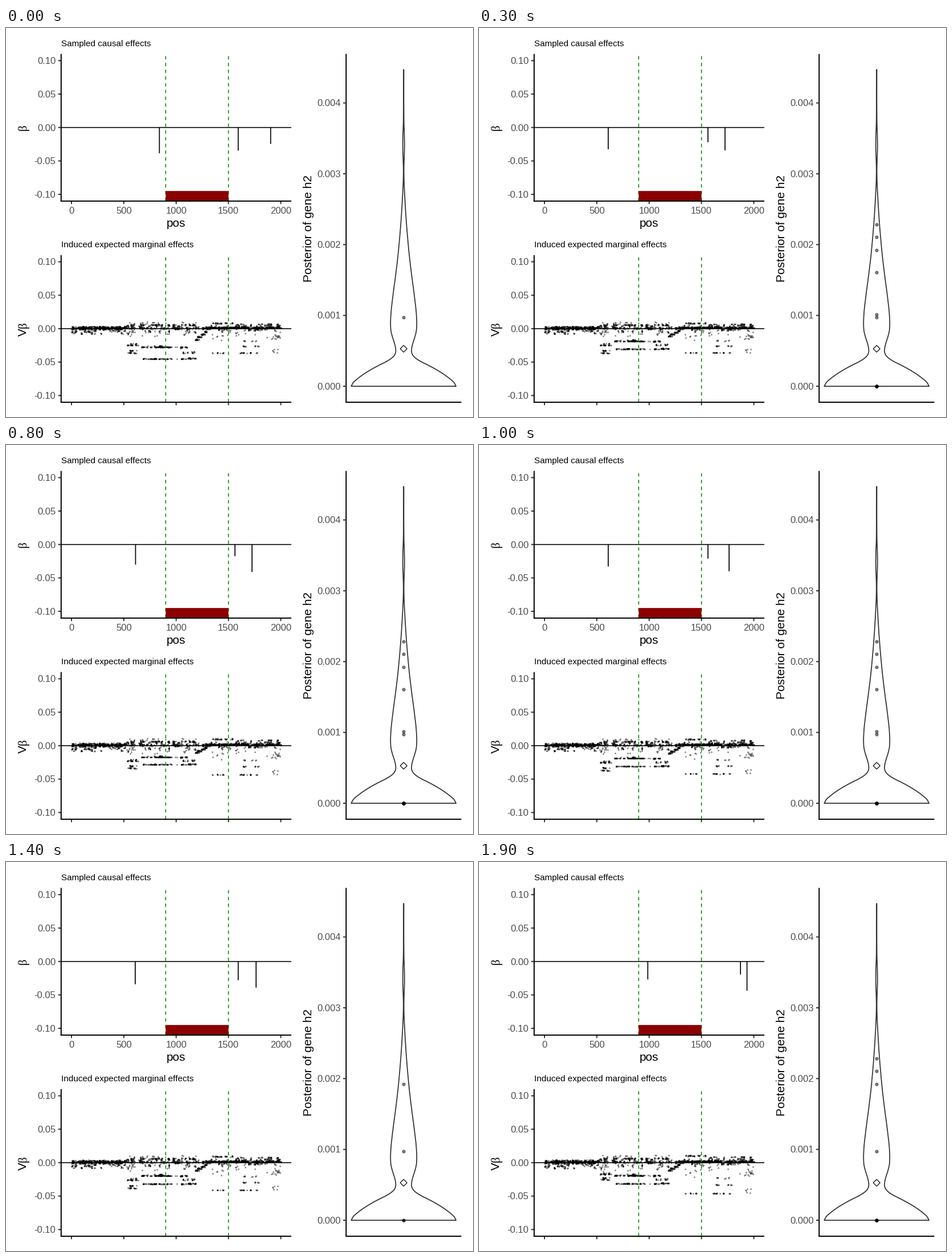
Animation, 820 px wide and 683 px high, one loop 2000 ms. Source, as a matplotlib script:

```python
import numpy as np
import matplotlib.pyplot as plt
from matplotlib.animation import FuncAnimation
from matplotlib.collections import LineCollection
from matplotlib.patches import Polygon, Rectangle

W, H, DPI = 820, 683, 100
PX = 72 / DPI
SANS, SERIF = "Liberation Sans", "Liberation Serif"
GREY, DARK, GREEN = "#4d4d4d", "#333333", "#008b00"
plt.rcParams["path.snap"] = False

# the small margin keeps the pixel size from being rounded down
fig = plt.figure(figsize=((W + .01) / DPI, (H + .01) / DPI), dpi=DPI, facecolor="white")
ax = fig.add_axes([0, 0, 1, 1])
ax.set_xlim(0, W)
ax.set_ylim(H, 0)
ax.axis("off")

TOP, LOW, MID = 174.7, 527.9, 698.2


def pos_x(p):
    return 115 + 0.18375 * np.asarray(p)


def beta_y(b, zero):
    return zero - 1174 * np.asarray(b)


def h2_y(v):
    return 629 - 124350 * np.asarray(v)


def line(x0, y0, x1, y1, color="black", width=1.6, z=3, **kw):
    ax.plot([x0, x1], [y0, y1], color=color, lw=width * PX, zorder=z,
            solid_capstyle="butt", dash_capstyle="butt", **kw)


def text(x, y, s, size=12, color="black", ha="center", rot=0, font=SANS):
    ax.text(x, y, s, fontsize=size, color=color, ha=ha, va="baseline",
            rotation=rot, rotation_mode="anchor", family=font)


def y_tick(x, y, label):
    line(x - 5.2, y, x, y, DARK, 2)
    text(x - 9.4, y + 5.8, label, color=GREY, ha="right")


def effect_panel(zero, title, labels):
    top, bottom = zero - 129.2, zero + 129.2
    line(96.8, top, 96.8, bottom + 1, width=2, z=6)
    line(95.8, bottom, 501, bottom, width=2, z=6)
    line(96.8, zero, 501, zero)
    for b in (0.1, 0.05, 0, -0.05, -0.1):
        y_tick(96.8, beta_y(b, zero), f"{b:.2f}")
    for p in range(0, 2001, 500):
        x = pos_x(p)
        line(x, bottom, x, bottom + 5.2, DARK, 2)
        if labels:
            text(x, 326, str(p), color=GREY)
    for p in (900, 1500):
        x = pos_x(p)
        line(x, bottom, x, top, GREEN, z=4, dashes=(3.7, 3.7))
    text(96.8, top - 13.5, title, size=11, ha="left")


def smooth(xs, ys, n=12):
    """Cubic curve through the given points."""
    slope = np.gradient(ys, xs)
    t = np.linspace(0, 1, n, endpoint=False)
    out = []
    for i in range(len(xs) - 1):
        d = xs[i + 1] - xs[i]
        y = ((2 * t**3 - 3 * t**2 + 1) * ys[i] + (t**3 - 2 * t**2 + t) * d * slope[i]
             + (3 * t**2 - 2 * t**3) * ys[i + 1] + (t**3 - t**2) * d * slope[i + 1])
        out.append(np.column_stack([xs[i] + d * t, y]))
    return np.vstack(out + [[[xs[-1], ys[-1]]]])


# static parts
effect_panel(TOP, "Sampled causal effects", True)
effect_panel(LOW, "Induced expected marginal effects", False)
gene = pos_x([900, 1500])
ax.add_patch(Rectangle((gene[0], 286.2), gene[1] - gene[0], 17.7, fc="#8b0000", lw=0, zorder=5))
text(298.7, 349, "pos", size=15)
text(36, 174.7, "β", size=15, rot=90, font=SERIF)
text(36, 540.5, "V", size=15, rot=90, ha="left")
text(36, 526.5, "β", size=15, rot=90, ha="left", font=SERIF)

line(597.2, 45.5, 597.2, 658, width=2)
line(596.2, 657.1, 799.5, 657.1, width=2)
for v in range(5):
    y_tick(597.2, h2_y(v / 1000), f"{v / 1000:.3f}")
text(537, 351.5, "Posterior of gene h2", size=15, rot=90)

shape = [(73, .3), (140, .3), (165, .5), (190, 1.3), (210, 1.5), (230, .9),
         (248, .4), (265, .6), (300, 2.2), (340, 4.7), (375, 7.6), (400, 10),
         (435, 14.2), (470, 18.8), (505, 22.5), (520, 23), (532, 22.2),
         (543, 19.5), (553, 16.3), (562, 14.2), (570, 14.2), (575, 16.5),
         (580, 21.5), (586, 31), (592, 43), (599, 56), (607, 69), (615, 80),
         (622, 88), (629, 92)]
curve = smooth(*np.array(shape, float).T)
sides = np.vstack([np.column_stack([MID - curve[:, 1], curve[:, 0]]),
                   np.column_stack([MID + curve[:, 1], curve[:, 0]])[::-1]])
ax.add_patch(Polygon(sides, fc="white", ec=DARK, lw=1.75 * PX, joinstyle="round", zorder=2))
ax.add_patch(Polygon([(MID - 6, 563.2), (MID, 557.2), (MID + 6, 563.2), (MID, 569.2)],
                     fc="white", ec="black", lw=1.2 * PX, zorder=5))

# posterior samples: position and effect of three causal sites
SITES = [
    (840, -.0385, 1593, -.0345, 1903, -.0245),
    (853, -.0330, 1562, -.0300, 1873, -.0270),
    (612, -.0310, 1430, -.0440, 1873, -.0250),
    (609, -.0340, 1593, -.0280, 1764, -.0390),
    (840, -.0300, 1338, -.0450, 1903, -.0230),
    (612, -.0325, 1562, -.0295, 1764, -.0445),
    (609, -.0335, 1562, -.0240, 1725, -.0380),
    (853, -.0290, 1593, -.0310, 1873, -.0290),
    (987, -.0268, 1873, -.0195, 1935, -.0437),
    (987, -.0290, 1593, -.0250, 1903, -.0380),
    (612, -.0310, 1338, -.0400, 1873, -.0250),
    (609, -.0325, 1562, -.0220, 1725, -.0342),
    (609, -.0350, 1562, -.0260, 1764, -.0360),
    (609, -.0385, 1430, -.0445, 1873, -.0262),
    (612, -.0340, 1593, -.0290, 1873, -.0330),
    (840, -.0310, 1562, -.0230, 1725, -.0400),
    (612, -.0300, 1562, -.0175, 1725, -.0412),
    (853, -.0320, 1593, -.0270, 1903, -.0350),
    (609, -.0330, 1562, -.0210, 1764, -.0400),
    (853, -.0285, 1338, -.0430, 1873, -.0236),
]
H2 = np.zeros(20)
H2[[0, 2, 4, 8, 9, 10, 19]] = (.000975, .00192, .00228, .002105, .00161, .001012, .0023)
ORDER = sorted(range(1, 21), key=str)

# each variant: position, own offset, and weights on the left, block and right signals
rng = np.random.default_rng(7)
variants = []
LEFT, BLOCK, RIGHT = 0, 1, 2


def add(x0, x1, n, off=0.0, spread=.0004, signal=None, k=0.0, clump=3):
    centers = rng.uniform(x0, x1, n // clump + 1)
    x = np.clip(rng.choice(centers, n) + rng.normal(0, 5, n), x0, x1)
    w = np.zeros((n, 3))
    if signal is not None:
        w[:, signal] = k
    variants.append(np.column_stack([x, off + rng.uniform(-spread, spread, n), w]))


add(0, 525, 330, .0012, .0028, clump=2)
add(0, 525, 160, .0014, .0010, clump=2)
for row, n in ((-.0035, 34), (-.0052, 30), (-.0078, 22)):
    add(0, 525, n, row, .0009)
add(525, 1200, 110, .0062, .0010)
add(525, 1200, 60, .0038, .0012)
add(525, 1200, 150, .0008, .0016)
add(525, 1200, 45, -.0045, .0022)
add(525, 1200, 16, -.0095, .0035, clump=1)
add(525, 1200, 22, .0092, .0020, clump=1)

add(670, 1010, 95, signal=LEFT, k=.61)
add(1010, 1110, 22, signal=LEFT, k=.62, spread=.0008)
add(650, 1080, 12, .0015, signal=LEFT, k=.60)
add(640, 1150, 75, signal=LEFT, k=1)
add(1110, 1185, 30, signal=LEFT, k=.98, spread=.0005)
add(1040, 1190, 18, signal=LEFT, k=.79, spread=.0012)
for row, n in ((1, 16), (.9, 14), (.68, 22), (.62, 8)):
    add(528, 645, n, signal=BLOCK, k=row, spread=.0005)
for x0, k in ((1180, .36), (1205, .27), (1235, .19), (1270, .1)):
    add(x0, x0 + 40, 18, signal=LEFT, k=k, spread=.0009)
add(1250, 1330, 40, .0012, .0025)
add(1180, 1260, 14, .003, .003)

add(1320, 2000, 300, .0020, .0012, clump=2)
add(1320, 2000, 190, .0015, .0007, clump=2)
add(1330, 2000, 70, .0048, .0016)
add(1330, 1560, 34, .0003, .0008, RIGHT, -.22)
add(1560, 2000, 36, .0005, .0012, RIGHT, -.16)
add(1330, 2000, 60, -.0015, .0015)
add(1330, 2000, 26, -.0065, .0050, clump=1)
add(1330, 1460, 11, signal=RIGHT, k=1, spread=.0003)
add(1550, 1810, 20, signal=RIGHT, k=1, spread=.0003)
add(1900, 1990, 6, signal=RIGHT, k=.92, spread=.003, clump=1)
add(1560, 1790, 13, signal=RIGHT, k=.72, spread=.0004)
add(1560, 1790, 8, signal=RIGHT, k=.5, spread=.001, clump=1)
add(1330, 1450, 5, signal=RIGHT, k=.35, spread=.006, clump=1)
add(1840, 1990, 14, signal=RIGHT, k=.36, spread=.003, clump=1)
variants = np.vstack(variants)

sticks = LineCollection([], colors="black", linewidths=1.7 * PX, zorder=4)
ax.add_collection(sticks)
cloud = ax.scatter([], [], s=4.4, c="black", alpha=.45, linewidths=0, zorder=3)
draws = ax.scatter([], [], s=14, facecolors=(0, 0, 0, .5), edgecolors=(0, 0, 0, .5),
                   linewidths=1 * PX, zorder=6)


def update(i):
    k = ORDER[i]
    p1, b1, p2, b2, p3, b3 = SITES[k - 1]
    sticks.set_segments([[(pos_x(p), TOP), (pos_x(p), beta_y(b, TOP))]
                         for p, b in ((p1, b1), (p2, b2), (p3, b3))])
    left, block = (.935, 1.12) if p1 < 700 else (1.17, .94)
    right = 1.05 * min(b2, b3)
    signal = np.array([left * b1, block * b1, right])
    scale = .5 - right / .09
    effect = variants[:, 1] * scale + variants[:, 2:] @ signal
    cloud.set_offsets(np.column_stack([pos_x(variants[:, 0]), beta_y(effect, LOW)]))
    draws.set_offsets(np.column_stack([np.full(k, MID), h2_y(H2[:k])]))
    return sticks, cloud, draws


anim = FuncAnimation(fig, update, frames=20, interval=100, repeat=True, repeat_delay=0)
plt.show()
```
